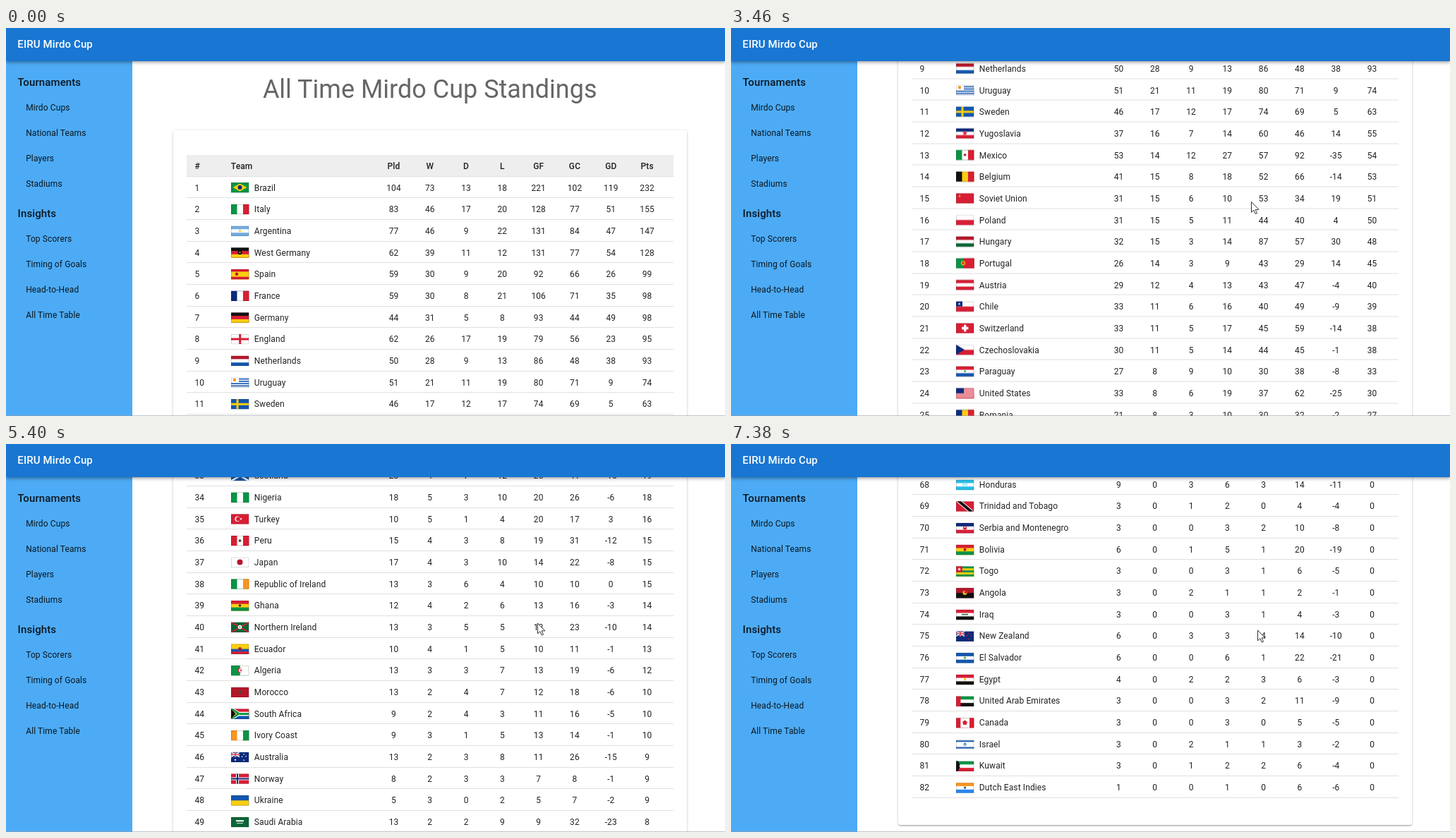
An HTML page with a canvas that plays this animation: 1019x550 px, repeating every 8000 ms.

```html
<!DOCTYPE html>
<html lang="en">
<head>
<meta charset="utf-8">
<title>EIRU Mirdo Cup</title>
<style>
html, body { margin: 0; width: 100%; height: 100%; overflow: hidden; background: #fff; }
body { position: relative; font: 12px Roboto, Arial, sans-serif; letter-spacing: .00938em; color: rgba(0,0,0,.87); }
body::after { content: ""; position: absolute; left: 0; right: 0; top: 549px; height: 1px; background: rgba(150,160,170,.6); }
header, nav, main, #cursor, .label, canvas { position: absolute; }
header { left: 0; top: 0; width: 100%; height: 47px; background: #1976d2; color: #fff;
  box-shadow: 0 1.5px 3px -.7px rgba(0,0,0,.2), 0 3px 4px rgba(0,0,0,.14), 0 1px 7px rgba(0,0,0,.12); }
nav { left: 0; top: 0; width: 179px; height: 550px; background: #4dabf5; }
main { left: 0; top: 0; width: 1019px; }
.label { line-height: 40px; margin-top: -20px; white-space: nowrap; }
.head { font-size: 15px; font-weight: 500; letter-spacing: .0075em; }
h1 { position: absolute; margin: 0; left: 300.7px; width: 600px; top: 57px; text-align: center;
  font-size: 36px; font-weight: 400; line-height: 60px; letter-spacing: 0; color: #666; }
.card { position: absolute; left: 237px; top: 144.5px; width: 727.5px; height: 2619px; border-radius: 3px; background: #fff;
  box-shadow: 0 .75px 3.75px rgba(0,0,0,.2), 0 1.5px 1.5px rgba(0,0,0,.14), 0 2.25px .75px -1.5px rgba(0,0,0,.12); }
.table { position: absolute; left: 255.5px; top: 180px; width: 690.5px; }
.row { display: grid; grid-template-columns: 63.3px 205.05px repeat(8, 51.3px); height: 30.68px;
  line-height: 32px; box-shadow: inset 0 -1px #e0e0e0; text-align: center; white-space: nowrap; }
.row span:nth-child(1) { text-align: left; padding-left: 12px; }
.row span:nth-child(2) { text-align: left; padding-left: 33px; }
.row.top { background: #eee; font-weight: 500; }
.row.top span:nth-child(2) { padding-left: 0; }
canvas { left: 63.5px; top: 30.68px; }
#cursor { left: 0; top: 0; overflow: visible; }
</style>
</head>
<body>
<main id="page">
  <h1>All Time Mirdo Cup Standings</h1>
  <div class="card"></div>
  <div class="table" id="table"></div>
</main>
<nav id="nav"></nav>
<header><div class="label head" style="left:16.3px;top:22.5px">EIRU Mirdo Cup</div></header>
<svg id="cursor" width="14" height="20"><path d="M.5 .5V15.3L3.9 12.2L6.3 17.6L8.5 16.6L6.2 11.4H11Z" fill="#fff" stroke="#333" stroke-width="1"/></svg>
<script>
// Team | won, drawn, lost, goals for, goals against | flag
const TEAMS = `Brazil|73 13 18 221 102|hg my dn,12.5,7,3
Italy|46 17 20 128 77|vgwr
Argentina|46 9 22 131 84|hBwB dy,12.5,7,1.5
West Germany|39 11 12 131 77|hkry dk,12.5,7,3 dy,12.5,7,1
Spain|30 9 20 92 66|hryyr dR,8,7,2.2
France|30 8 21 106 71|vnwr
Germany|31 5 8 93 44|hkry
England|26 17 19 79 56|hw pr,3
Netherlands|28 9 13 86 48|hRwb
Uruguay|21 11 19 80 71|hwbwbwbwbw bw,0,0,11,7 do,5,3.5,2.2
Sweden|17 12 17 74 69|hb ny,3
Yugoslavia|16 7 14 60 46|hnwr sr,12.5,7,4
Mexico|14 12 27 57 92|vgwr dR,12.5,7,1.8
Belgium|15 8 18 52 66|vkyr
Soviet Union|15 6 10 53 34|hr sy,5,4,2
Poland|15 5 11 44 40|hwr
Hungary|15 3 14 87 57|hRwG
Portugal|14 3 9 43 29|vggrrr dy,10,7,3 dr,10,7,1.8
Austria|12 4 13 43 47|hrwr
Chile|11 6 16 40 49|hwr bn,0,0,9,7 sw,4.5,3.5,2
Switzerland|11 5 17 45 59|hr bw,11,2.5,3.4,9.5 bw,8,5.5,9.4,3.5
Czechoslovakia|11 5 14 44 45|hwr tn
Paraguay|8 9 10 30 38|hrwb dg,12.5,7,1.3
United States|8 6 19 37 62|hrwrwrwrwrwrwr bn,0,0,11,7.5
Romania|8 3 10 30 32|vnyr
South Korea|6 8 17 31 67|hw dr,12.5,7,3.6 dn,12.5,8.6,2.4 lk,4,4,6,2,2 lk,19,2,21,4,2 lk,4,10,6,12,2 lk,19,12,21,10,2
Denmark|8 2 6 27 24|hr nw,2.5
Colombia|7 2 9 26 27|hyybr
Croatia|7 2 7 21 17|hrwn dr,12.5,6.5,2.5 dw,12.5,6.5,1
Costa Rica|6 2 7 17 23|hnwrrwn
Bulgaria|4 7 15 22 53|hwgr
Cameroon|4 7 12 18 43|vgry sy,12.5,7,2.2
Scotland|4 7 12 25 41|hb xw,2.5
Nigeria|5 3 10 20 26|vgwg
Turkey|5 1 4 20 17|hr dw,9,7,3.6 dr,10,7,2.9 sw,14,7,2
Peru|4 3 8 19 31|vrwr dg,12.5,7,2 dR,12.5,7.5,1.3
Japan|4 3 10 14 22|hw dR,12.5,7,4
Republic of Ireland|3 6 4 10 10|vgwo
Ghana|4 2 6 13 16|hryg sk,12.5,7,2.6
Northern Ireland|3 5 5 13 23|hG xr,1.8 dw,12.5,7,2.8 dg,12.5,7,1
Ecuador|4 1 5 10 11|hyybr dR,12.5,7,2.4
Algeria|3 3 7 13 19|vgw dr,12.5,7,3.4 dw,13.6,7,2.7 sr,14,7,2
Morocco|2 4 7 12 18|hR sG,12.5,7,3
South Africa|2 4 3 11 16|hrrrwggwbbb lw,0,0,11,7,5 lw,0,14,11,7,5 lg,0,0,11,7,3 lg,0,14,11,7,3 ty,8 tk,6.5
Ivory Coast|3 1 5 13 14|vowg
Australia|2 3 8 11 26|hn un sw,6,11,1.8 sw,18,3,1.3 sw,21,6,1.3 sw,15.5,6.5,1.3 sw,18,11.5,1.4
Norway|2 3 3 7 8|hr nw,4 nn,2
Ukraine|3 0 2 5 7|hby
Saudi Arabia|2 2 9 9 32|hG bw,7,4.5,11,2 bw,8,8.5,9,.8
Russia|2 2 5 13 13|hwbr
Senegal|2 2 1 7 6|vgyr sg,12.5,7,2.2
East Germany|2 2 2 5 5|hkry dy,12.5,7,3.4 dR,12.5,7,2.4
Greece|2 1 7 5 20|hbwbwbwbwb bb,0,0,8.5,7.8 bw,3.5,0,1.5,7.8 bw,0,3.1,8.5,1.5
Tunisia|1 4 7 8 17|hr dw,12.5,7,4 dr,12.7,7,2.8 dw,13.5,7,2.2 sr,13.3,7,1.7
Iran|1 3 8 7 22|hgwr dr,12.5,7,1.4
Wales|1 3 1 4 4|hwg dr,12,7.5,3.4 lr,6,9,19,5,2 lr,8,4,17,10,2 lr,8,12,10,8,1.5 lr,16,12,15,8,1.5
North Korea|1 1 5 6 21|hbwrrrrrwb dw,9,7,3.4 sr,9,7,3.2
Slovakia|1 1 2 5 7|hwbr dw,8,7,3.6 dr,8,7,3
Slovenia|1 1 4 5 10|hwbr db,7,4.5,2
Cuba|1 1 1 5 12|hbwbwb tr sw,4,7,2.2
Czech Republic|1 0 2 3 4|hwr tn
Serbia|1 0 2 2 3|hrnw dr,9,6,2.5
Jamaica|1 0 2 3 9|hg tk,11 ty,2 xy,2.5
Bosnia and Herzegovina|1 0 2 4 4|hn ly,9,1,19,12,5
Haiti|0 0 3 2 14|hnr bw,9,4,7,6 dg,12.5,7,2
Zaire|0 0 3 0 14|hL dy,12.5,7,3.6 lR,11,9,14,5,1.5
China|0 0 3 0 9|hr sy,5,4.5,3 sy,10,2.5,1 sy,11,5,1 sy,10,8,1
Honduras|0 3 6 3 14|hCwC dC,12.5,7,.8 dC,10,6,.7 dC,15,6,.7 dC,10,8,.7 dC,15,8,.7
Trinidad and Tobago|0 1 2 0 4|hr lw,3,-1,22,15,6 lk,3,-1,22,15,4
Serbia and Montenegro|0 0 3 2 10|hnwr dr,12.5,7,2.6 dw,12.5,6,1
Bolivia|0 1 5 1 20|hryg dR,12.5,7,2
Togo|0 0 3 1 6|hgygyg br,0,0,9,8.4 sw,4.5,4.2,2.6
Angola|0 2 1 1 2|hRk dy,12.5,7,3 dr,13.4,6,2
Iraq|0 0 3 1 4|hrwk bG,8,6.3,9,1.4
New Zealand|0 3 3 4 14|hn un sr,18,3,1.5 sr,21,6,1.5 sr,15.5,6.5,1.5 sr,18,11,1.5
El Salvador|0 0 6 1 22|hbwb dg,12.5,7,1.6 dy,12.5,7,.8
Egypt|0 2 2 3 6|hrwk dy,12.5,7,1.8
United Arab Emirates|0 0 3 2 11|hgwk br,0,0,6.5,15
Canada|0 0 3 0 5|vrwwr sr,12.5,7,4.5 dr,12.5,7,2.8
Israel|0 2 1 1 3|hw bb,0,1.5,26,2 bb,0,10.8,26,2 db,12.5,7,2 dw,12.5,7,1
Kuwait|0 1 2 2 6|hgwr lk,0,-1,4,7,4 lk,0,15,4,7,4 bk,0,2,4,10
Dutch East Indies|0 0 1 0 6|howl db,12.5,7,1.6 dy,11.5,6,.8`.split("\n").map(line => line.split("|"));

const COLORS = { r: "#d81e34", R: "#b5172b", g: "#0a9445", G: "#0b6636", b: "#1356ae", B: "#74acdf", n: "#0b2a7c",
  y: "#fcce10", w: "#fff", k: "#111", o: "#f9951f", l: "#2a86f0", L: "#58bb45", C: "#25bfe8" };
const LOOP = 8000, ROW = 30.68, W = 25.4, H = 14.5;
const $ = id => document.getElementById(id);

function label(text, x, y, cls = "") {
  $("nav").insertAdjacentHTML("beforeend", `<div class="label ${cls}" style="left:${x}px;top:${y}px">${text}</div>`);
}
function menu(title, y, items) {
  label(title, 16.6, y, "head");
  items.forEach((item, i) => label(item, 28.2, y + 35.8 + i * 36.1));
}
menu("Tournaments", 77, ["Mirdo Cups", "National Teams", "Players", "Stadiums"]);
menu("Insights", 263, ["Top Scorers", "Timing of Goals", "Head-to-Head", "All Time Table"]);

const row = (cells, cls = "") => `<div class="row ${cls}">${cells.map(c => `<span>${c}</span>`).join("")}</div>`;
$("table").innerHTML = row(["#", "Team", "Pld", "W", "D", "L", "GF", "GC", "GD", "Pts"], "top") +
  TEAMS.map(([name, stats], i) => {
    const [w, d, l, gf, gc] = stats.split(" ").map(Number);
    return row([i + 1, name, w + d + l, w, d, l, gf, gc, gf - gc, w ? 3 * w + d : 0]);
  }).join("");

const canvas = document.createElement("canvas");
canvas.width = Math.ceil(W);
canvas.height = Math.ceil(TEAMS.length * ROW);
$("table").append(canvas);
const g = canvas.getContext("2d");

function rect(c, x, y, w, h) {
  g.fillStyle = COLORS[c];
  g.fillRect(x, y, w, h);
}
function poly(c, points) {
  g.fillStyle = COLORS[c];
  g.beginPath();
  points.forEach(p => g.lineTo(...p));
  g.fill();
}
function line(c, x1, y1, x2, y2, width) {
  g.strokeStyle = COLORS[c];
  g.lineWidth = width;
  g.beginPath();
  g.moveTo(x1, y1);
  g.lineTo(x2, y2);
  g.stroke();
}
const draw = {
  h: cs => [...cs].forEach((c, i) => rect(c, 0, i * H / cs.length, W, H)),
  v: cs => [...cs].forEach((c, i) => rect(c, i * W / cs.length, 0, W, H)),
  b: rect,
  l: line,
  d(c, x, y, r) {
    g.fillStyle = COLORS[c];
    g.beginPath();
    g.arc(x, y, r, 0, 7);
    g.fill();
  },
  s(c, x, y, r) {
    poly(c, Array.from({ length: 10 }, (_, i) => {
      const a = i * Math.PI / 5, q = i % 2 ? r * .4 : r;
      return [x + q * Math.sin(a), y - q * Math.cos(a)];
    }));
  },
  m: c => poly(c, [[2.5, 7], [12.5, 1.5], [22.5, 7], [12.5, 12.5]]),
  t: (c, x = 12) => poly(c, [[0, 0], [x, H / 2], [0, H]]),
  x(c, width, w = W, h = H) {
    line(c, 0, 0, w, h, width);
    line(c, 0, h, w, 0, width);
  },
  p(c, width, x = W / 2, w = W, h = H) {
    line(c, x, 0, x, h, width);
    line(c, 0, h / 2, w, h / 2, width);
  },
  n: (c, width) => draw.p(c, width, 9),
  u(c) {
    rect(c, 0, 0, 12, 7);
    draw.x("w", 1.5, 12, 7);
    draw.p("w", 2.4, 6, 12, 7);
    draw.p("r", 1.3, 6, 12, 7);
  }
};
TEAMS.forEach(([, , flag], i) => {
  g.save();
  g.translate(0, (i + .5) * ROW - H / 2);
  g.beginPath();
  g.rect(0, 0, W, H);
  g.clip();
  for (const part of flag.split(" ")) {
    const [c, ...n] = part.slice(1).split(",");
    draw[part[0]](c, ...n.map(Number));
  }
  g.strokeStyle = "rgba(0,0,0,.16)";
  g.lineWidth = 1;
  g.strokeRect(.5, .5, W - 1, H - 1);
  g.restore();
});

// start, end, steps, distance
const SCROLLS = [[3040, 3730, 11, 545.6], [4000, 4530, 9, 393.9], [5190, 5740, 9, 444.5], [6140, 6910, 12, 766.5], [7170, 7380, 4, 73.6]];
const MOVES = [[810, 1570, 12, -196, -261], [1640, 1990, 6, -47, -41], [4000, 4530, 9, 16, 7.5], [6140, 6910, 12, -7, 10]];

function progress(t, [start, end, steps]) {
  if (t < start) return 0;
  const k = Math.floor((t - start) * (steps - 1) / (end - start) + 1e-6) + 1;
  const u = Math.min(1, k / steps) ** .85;
  return u * u * (3 - 2 * u);
}
const travel = (t, list, i) => list.reduce((sum, m) => sum + m[i] * progress(t, m), 0);

function render(t) {
  $("page").style.transform = `translateY(${-travel(t, SCROLLS, 3)}px)`;
  const x = 980 + travel(t, MOVES, 3), y = 548 + travel(t, MOVES, 4);
  $("cursor").style.visibility = t < MOVES[0][0] ? "hidden" : "visible";
  $("cursor").style.transform = `translate(${x}px,${y}px)`;
}
const begin = performance.now();
function tick() {
  render((performance.now() - begin) % LOOP);
  requestAnimationFrame(tick);
}
tick();
</script>
</body>
</html>
```
